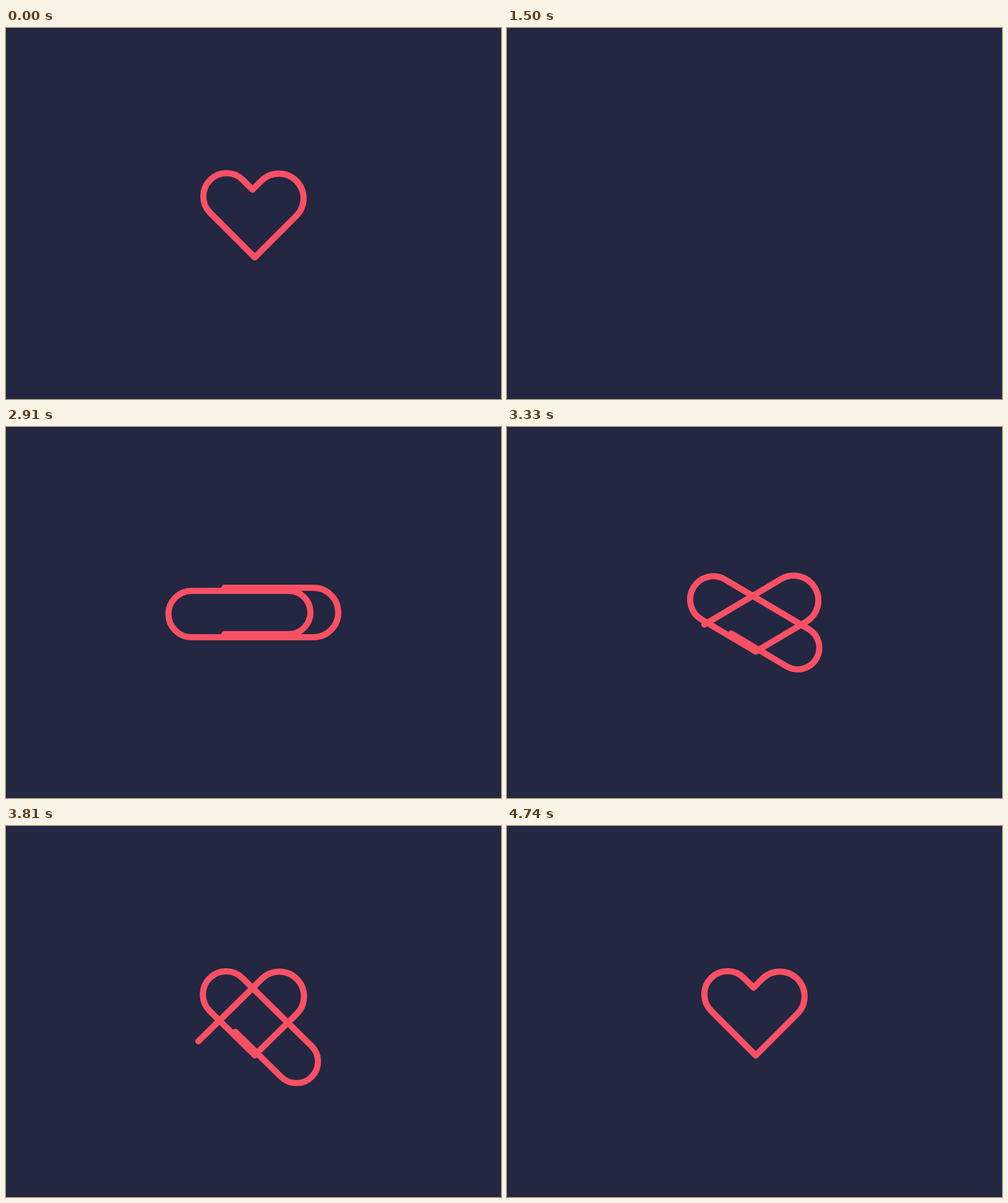
An HTML page with a canvas for the animation above (4.92 s loop, 800 by 600 pixels).

```html
<!DOCTYPE html>
<html lang="en">
<head>
<meta charset="utf-8">
<title>Heart and paperclip</title>
<style>
  html, body { margin: 0; width: 100%; height: 100%; overflow: hidden; background: #232741; }
  canvas { display: block; }
</style>
</head>
<body>
<canvas id="stage" width="800" height="600"></canvas>
<script>
const ctx = document.getElementById('stage').getContext('2d');
const RED = '#fb5064', YELLOW = '#ffba29', BACK = '#232741';
const LOOP = 4920, STEP = 30;
const { PI, SQRT2 } = Math;

// Both halves meet at the hinge, which is their shared zero point.
const HINGE = { x: 402, y: 340, drop: 31 };

// Left half: inner end, small bend, top wire, left bend, hinge.
const left = new Path2D();
left.moveTo(-49, -5);
left.lineTo(55, -5);
left.arc(55, -40, 35, PI / 2, -PI / 2, true);
left.lineTo(-102, -75);
left.arc(-102, -37.5, 37.5, -PI / 2, PI / 2, true);
left.lineTo(0, 0);
const leftLength = 104 + 35 * PI + 157 + 37.5 * PI + 102;

// Right half: hinge, large bend, outer end.
const right = new Path2D();
right.moveTo(0, 0);
right.lineTo(95, 0);
right.arc(95, -40, 40, PI / 2, -PI / 2, true);
right.lineTo(-49, -80);
const rightLength = 95 + 40 * PI + 144;

const total = leftLength + rightLength;
const leftSpare = 104 + 35 * PI + 135;   // wire beyond the notch of the heart
const rightSpare = 124;

// Cubic easing with control points (x1, 0) and (x2, 1).
function ease(t, start, duration, x1 = 0.4, x2 = 0.1) {
  const u = (t - start) / duration;
  if (u <= 0) return 0;
  if (u >= 1) return 1;
  let low = 0, high = 1, s;
  for (let i = 0; i < 30; i++) {
    s = (low + high) / 2;
    const r = 1 - s;
    if (3 * r * r * s * x1 + 3 * r * s * s * x2 + s ** 3 < u) low = s;
    else high = s;
  }
  return s * s * (3 - 2 * s);
}

function strokePart(path, from, to, turn, y) {
  if (to <= from) return;
  ctx.save();
  ctx.translate(HINGE.x, y);
  ctx.rotate(turn);
  ctx.setLineDash([to - from, 3000]);
  ctx.lineDashOffset = -from;
  ctx.stroke(path);
  ctx.restore();
}

// fold: 0 is the paperclip, 1 is the heart.
function wire(color, fold, leftFrom, leftTo, rightTo) {
  const angle = fold * PI / 4;
  const y = HINGE.y + HINGE.drop * fold ** 0.75;
  ctx.strokeStyle = color;
  ctx.lineWidth = color === RED ? 10 : 9;
  strokePart(left, leftFrom, leftTo, angle, y);
  strokePart(right, 0, rightTo, -angle, y);
}

function heart(color, gone) {
  const from = leftSpare + (leftLength - leftSpare) * gone;
  wire(color, 1, from, leftLength, (rightLength - rightSpare) * (1 - gone));
}

function clip(color, drawn) {
  const length = total * drawn;
  wire(color, 0, 0, Math.min(length, leftLength), length - leftLength);
}

function draw(t) {
  ctx.fillStyle = BACK;
  ctx.fillRect(0, 0, 800, 600);
  if (t < 1860) {
    if (t > 390) heart(YELLOW, ease(t, 450, 1050));
    heart(RED, ease(t, 390, 1050));
  } else if (t < 2910) {
    clip(YELLOW, ease(t, 1860, 760));
    clip(RED, ease(t, 1860, 1050));
  } else {
    const fold = ease(t, 3030, 930, 0.3, 0);
    const trim = ease(t, 4170, 570);
    wire(RED, fold, leftSpare * trim, leftLength, rightLength - rightSpare * trim);
  }
}

ctx.lineCap = ctx.lineJoin = 'round';
const begin = performance.now();
function tick() {
  const t = (performance.now() - begin) % LOOP;
  draw(Math.floor(t / STEP) * STEP);
  requestAnimationFrame(tick);
}
tick();
</script>
</body>
</html>
```
